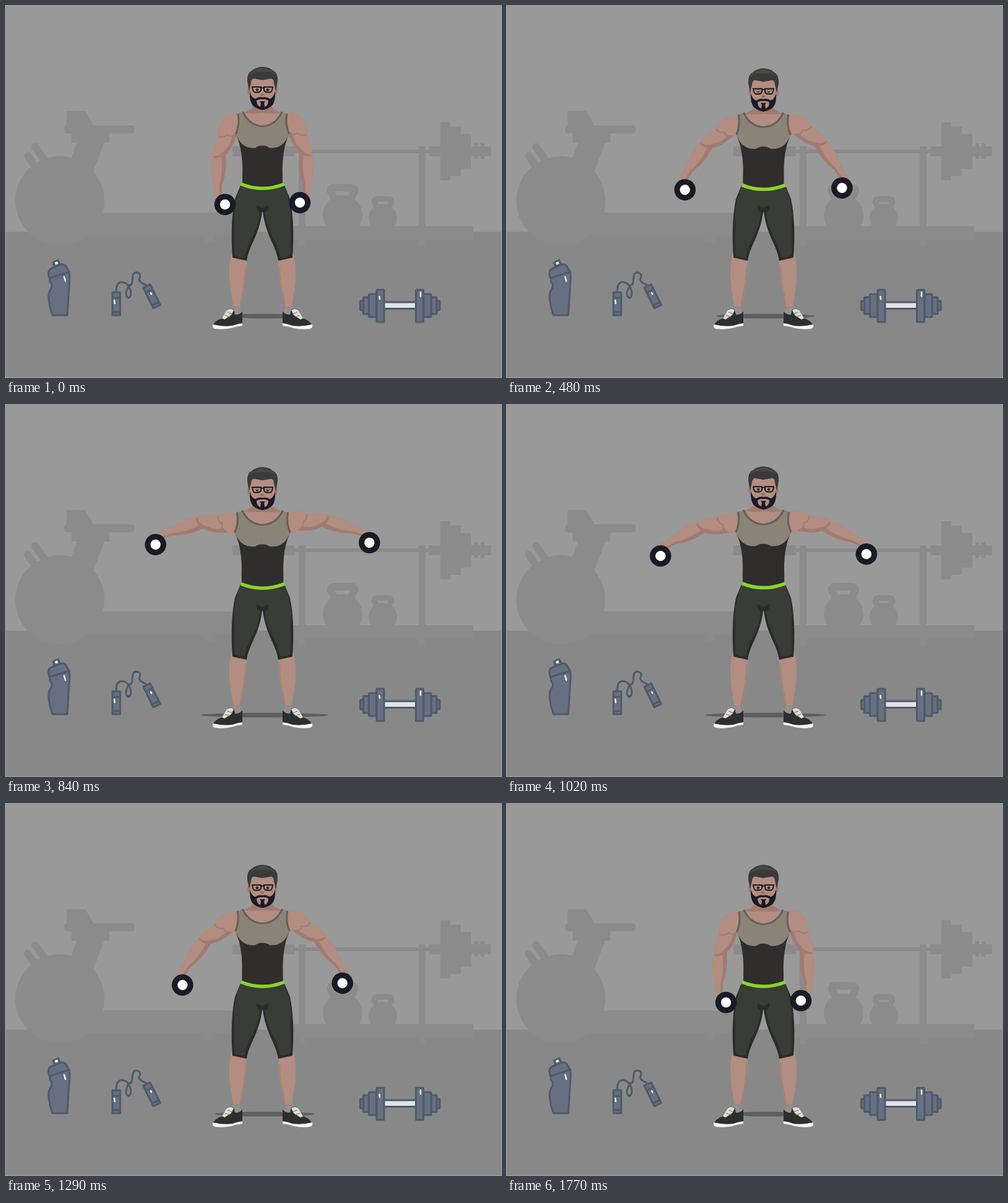
An HTML page for the animation above (2340 ms loop, 800x600 px).

```html
<!DOCTYPE html>
<html lang="en">
<head>
<meta charset="utf-8">
<title>Lateral raise</title>
<style>
  html, body { margin: 0; width: 100%; height: 100%; overflow: hidden; background: #999; }
  svg { display: block; width: 800px; height: 600px; }
  .skin { fill: #b38d81; }
  .shade { fill: #a17b70; }
  .ink { fill: #1a1a26; }
  .kit { fill: #667080; stroke: #4f5a6a; stroke-width: 3; stroke-linejoin: round; }
  .glint { fill: none; stroke: #fff; stroke-width: 2.4; stroke-linecap: round; }
  .line { fill: none; stroke: #a17b70; stroke-width: 2; stroke-linecap: round; }
  .trim { fill: none; stroke: #666058; stroke-width: 3; }
</style>
</head>
<body>
<svg viewBox="0 0 800 600">
  <rect width="800" height="600" fill="#999"/>
  <rect y="365" width="800" height="235" fill="#888"/>

  <!-- gym silhouettes -->
  <g fill="#8b8b8b">
    <circle cx="87" cy="315" r="72"/>
    <path d="M 35 242 L 49 262 M 47 228 L 64 252" stroke="#8b8b8b" stroke-width="12" stroke-linecap="round"/>
    <path d="M 98 170 L 128 170 L 142 194 L 98 194 Z"/>
    <rect x="94" y="193" width="114" height="13" rx="5"/>
    <rect x="106" y="205" width="61" height="16"/>
    <path d="M 115 220 L 159 220 L 141 268 L 104 250 Z"/>
    <rect x="130" y="334" width="236" height="37"/>
    <rect x="320" y="371" width="16" height="11"/>

    <rect x="366" y="227" width="101" height="16"/>
    <rect x="467" y="232" width="217" height="6"/>
    <rect x="473" y="227" width="11" height="161"/>
    <rect x="667" y="227" width="11" height="161"/>
    <rect x="684" y="227" width="100" height="16"/>
    <rect x="702" y="188" width="16" height="94"/>
    <rect x="718" y="195" width="17" height="80"/>
    <rect x="735" y="207" width="17" height="56"/>
    <rect x="757" y="222" width="6" height="25"/>
    <rect x="767" y="222" width="6" height="25"/>
    <rect x="460" y="356" width="295" height="22"/>

    <circle cx="544" cy="338" r="32"/>
    <path d="M 532 314 L 525 300 Q 524 294 530 294 L 558 294 Q 564 294 563 300 L 556 314" fill="none" stroke="#8b8b8b" stroke-width="12"/>
    <circle cx="609" cy="343" r="23"/>
    <path d="M 600 326 L 595 317 Q 595 312 600 312 L 618 312 Q 623 312 623 317 L 618 326" fill="none" stroke="#8b8b8b" stroke-width="9"/>
  </g>

  <!-- bottle -->
  <g class="kit">
    <path d="M 79 424 L 76 415 L 84 411 L 89 420 Z"/>
    <path d="M 71 438 L 102 429 L 103 438 L 99 500 L 75 500 C 69 484 67 466 71 460 Q 77 452 71 446 Z"/>
    <path d="M 69 436 Q 67 427 74 424 L 89 418 Q 95 417 98 423 L 102 430 L 70 440 Z"/>
  </g>
  <path d="M 79.5 416.5 L 83.5 415" stroke="#fff" stroke-width="4"/>
  <path class="glint" d="M 94 438 L 96 445"/>

  <!-- skipping rope -->
  <path d="M 178 462 C 178 449 183 445 190 447 C 202 450 205 470 198 472 C 190 470 195 453 203 450 C 206 442 202 431 211 431 C 219 432 217 439 215 442 C 216 448 222 448 227 452" fill="none" stroke="#4f5a6a" stroke-width="3"/>
  <g class="kit">
    <path id="grip" d="M 172 463 H 184.5 V 500 H 172 Z M 172 472 H 184.5 M 172 495 H 184.5"/>
    <use href="#grip" transform="translate(235.5 469.5) rotate(-26) translate(-178.2 -481.5)"/>
  </g>
  <path class="glint" d="M 175 476 L 175.5 481 M 234 464 L 235 466"/>

  <!-- dumbbell -->
  <g class="kit">
    <rect x="608" y="479" width="57" height="10.5" style="fill: #e2e2ea"/>
    <g id="plates">
      <rect x="572.5" y="477" width="5" height="15" rx="1"/>
      <rect x="577.5" y="471" width="9" height="27" rx="1"/>
      <rect x="586.5" y="466" width="12" height="37" rx="1"/>
      <rect x="599" y="459" width="12" height="52" rx="1"/>
    </g>
    <use href="#plates" transform="translate(1273.5) scale(-1 1)"/>
  </g>
  <path class="glint" d="M 603.5 470 L 604 474 M 670 463 L 670 469"/>

  <ellipse id="shadow" cx="418" cy="501.5" rx="60" ry="3.7" fill="#5e5e5e"/>

  <!-- The body is drawn as a left half and mirrored -->
  <g id="leg">
    <path class="skin" d="M 364 400 L 389 405 C 389 430 387 450 383 465 L 378 491 L 368 491 L 364 465 C 360 440 360 422 364 400 Z"/>
    <path class="line" d="M 387 420 Q 387 446 381 468 L 378 488 L 368 487" stroke-opacity=".7"/>
    <path d="M 365 487 L 378 489 L 380 499 L 364 499 Z" fill="#929292"/>
    <path d="M 334 515 Q 358 518 382 511 L 382 517 Q 372 518 364 521 Q 350 524 338 522 Q 333 521 334 515 Z" fill="#f5f5f5"/>
    <path d="M 335 515 Q 340 507 350 505 L 358 491 Q 363 488 368 491 L 370 499 Q 377 500 382 494 L 382 513 Q 374 514 366 517 Q 350 519 335 515 Z" fill="#2e2e2d"/>
    <path d="M 357 492 Q 363 488 368 492 L 364 500 L 353 507 L 349 505 Z" fill="#deddda"/>
    <path d="M 358 495 L 366 498 M 354 500 L 362 503" stroke="#777" stroke-width="1.3"/>
  </g>
  <use href="#leg" transform="translate(829) scale(-1 1)"/>

  <g id="arm">
    <g class="bob">
      <circle class="skin" cx="368" cy="193" r="16.5"/>
      <g class="swing">
        <path class="shade" d="M 336 234 C 331 250 331 268 335 285 L 337 312 Q 342 320 348 312 L 349 290 C 354 276 357 262 355 240 Z"/>
        <path class="skin" d="M 336 234 C 331 250 331 268 335 285 L 337 312 Q 341 318 345 312 L 345 290 C 349 276 351 256 347 240 Z"/>
        <path class="shade" d="M 376 175 C 360 174 349 181 345 193 C 341 204 343 212 340 220 C 334 230 333 240 336 245 C 342 248 352 244 357 238 C 366 230 370 216 374 205 Z"/>
        <path class="skin" d="M 376 175 C 360 174 349 181 345 193 C 341 204 343 212 340 220 C 334 230 333 240 336 243 C 343 243 350 239 353 233 C 360 228 364 218 365 210 L 375 204 Z"/>
        <path class="line" d="M 344 211 Q 352 214 358 208 Q 364 213 370 208"/>
      </g>
    </g>
  </g>
  <use href="#arm" transform="translate(829 -3) scale(-1 1)"/>

  <g id="chest">
    <g id="torso">
      <path class="skin" d="M 416 155 L 399 155 L 399 165 Q 390 172 374 175 L 380 205 L 416 205 Z"/>
      <path class="shade" d="M 416 155 L 399 155 L 399 164 Q 394 169 384 173 Q 399 175 416 173 Z"/>
      <path d="M 371 205 L 377 222 Q 383 245 382 272 L 382 302 L 416 302 L 416 215 L 390 215 Z" fill="#2f2e2c"/>
      <path d="M 375 174 L 384 171 Q 393 194 416 194.5 L 416 226 Q 409 225 403 229.5 C 388 231 378 224 371 206 Q 378 192 375 174 Z" fill="#8b8378"/>
      <path class="trim" d="M 383 171 Q 393 194 416 194.5 M 375 174 Q 378 192 371.5 207"/>
    </g>
    <use href="#torso" transform="translate(829) scale(-1 1)"/>
  </g>

  <g id="shorts">
    <path d="M 379 290 Q 397 297 416 297 L 416 333 L 414 333 C 409 372 393 386 389 412 L 366 407 Q 362 350 370 312 Z" fill="#2b2c2a"/>
    <path d="M 379 291 Q 397 297 416 297 L 416 327 Q 409 325 405 322 Q 404 331 410 334 C 408 365 391 378 386 406 Q 377 408 369 402 Q 368 380 369 352 Q 366 325 379 291 Z" fill="#3a3c36"/>
  </g>
  <use href="#shorts" transform="translate(829) scale(-1 1)"/>
  <path id="belt" d="M 380 288 Q 414 302 450 288" fill="none" stroke="#8bd32f" stroke-width="5.5"/>

  <g class="bob">
    <g id="face">
      <ellipse class="shade" cx="393" cy="137" rx="3" ry="6"/>
      <path class="skin" d="M 416 112 L 394 112 L 394 142 Q 397 161 416 165 Z"/>
      <path d="M 416 98.5 Q 405 98 398 104 Q 389 108 390 122 L 393 138 L 396 124 Q 397 115 404 118 L 416 120 Z" fill="#3a3a39"/>
      <path d="M 416 100 Q 408 100 405 103 Q 397 104 392 112 Q 402 105 416 106 Z" fill="#484847"/>
      <path class="ink" d="M 394 138 Q 397 149 403 150 Q 408 146 416 148 L 416 168 Q 407 168 399 161 Q 393 154 394 138 Z"/>
      <path class="skin" d="M 416 151 Q 409 150 405 153 Q 405 161 411 163 L 412 157 L 410 154 L 416 154 Z"/>
      <circle cx="406" cy="135.5" r="2.2" fill="#29272a"/>
      <rect class="shade lid" x="401" y="132" width="9" height="4"/>
      <path d="M 398 131 L 412 131 L 412 136 Q 411 139.5 407 139.5 L 402 139.5 Q 399 139 398 131 Z M 412 132.5 L 416 132.5" fill="none" stroke="#1b1b22" stroke-width="2"/>
    </g>
    <use href="#face" transform="translate(829) scale(-1 1)"/>
    <path d="M 410.5 142.5 Q 414 141 417.5 142.5 L 414 146 Z" fill="#90655c"/>
  </g>

  <!-- weights stay in front -->
  <g id="weight">
    <g class="bob"><g class="swing">
      <circle class="ink" cx="354" cy="321" r="17.3"/>
      <circle cx="354" cy="321" r="8.2" fill="#fff"/>
    </g></g>
  </g>
  <use href="#weight" transform="translate(829 -3) scale(-1 1)"/>
</svg>
<script>
const LOOP = 2340, STEP = 30;

function place(selector, value) {
  document.querySelectorAll(selector).forEach(el => el.setAttribute('transform', value));
}

// Cosine ease from 0 to 1 between two times
function ease(t, from, to) {
  const u = Math.min(1, Math.max(0, (t - from) / (to - from)));
  return (1 - Math.cos(Math.PI * u)) / 2;
}

function pose(t) {
  const lift = ease(t, 165, 835) * (1 - ease(t, 785, 1760));
  const dip = ease(t, 60, 520) * (1 - ease(t, 620, 1300));
  const bob = 2.7 * dip;
  place('.bob', `translate(0 ${bob})`);
  place('.swing', `rotate(${71.3 * lift} 366.4 193.2)`);
  place('#chest', `translate(414.5 ${bob - 2.7 * lift}) scale(${1 + 0.04 * lift} 1) translate(-414.5 0)`);
  place('#belt', `translate(0 ${0.6 * bob})`);
  place('.lid', `translate(0 132) scale(1 ${dip}) translate(0 -132)`);
  document.querySelector('#shadow').setAttribute('rx', 60 + 44 * lift);
}

const start = performance.now();
function frame() {
  const t = (performance.now() - start) % LOOP;
  pose(Math.floor(t / STEP) * STEP);
  requestAnimationFrame(frame);
}
frame();
</script>
</body>
</html>
```
